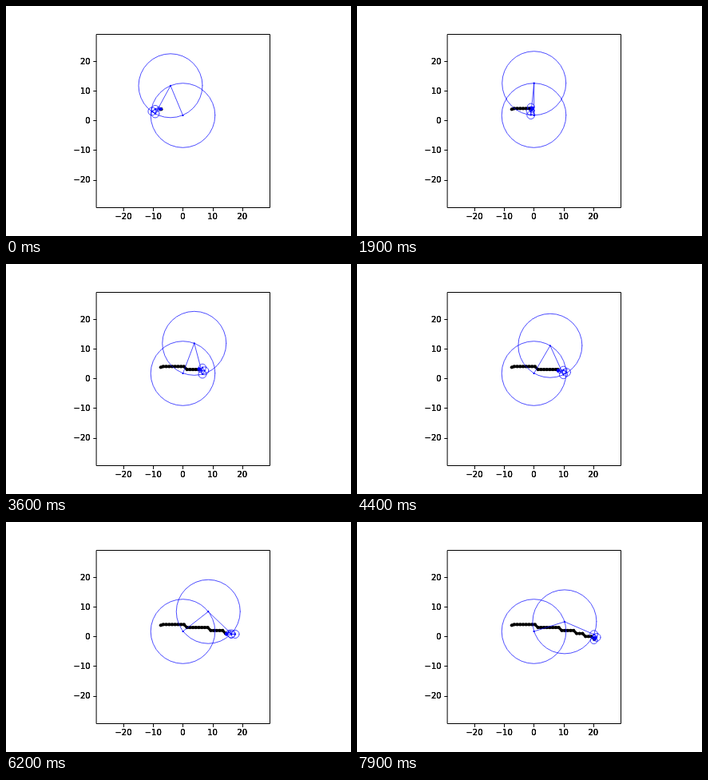
An HTML page with a canvas that plays this animation: 432x288 px, repeating every 8000 ms.

```html
<!DOCTYPE html>
<html>
<head>
<meta charset="utf-8">
<style>
html, body { margin: 0; width: 100%; height: 100%; overflow: hidden; background: #fff; }
canvas { display: block; }
</style>
</head>
<body>
<canvas id="stage" width="432" height="288"></canvas>
<script>
const ctx = document.getElementById('stage').getContext('2d');
const SCALE = 3.72, X0 = 221.4, Y0 = 143.28, RAD = Math.PI / 180;
const STEP = 100, FRAMES = 80, TURN = 1.204;
const BLUE = '#00f';
const px = x => X0 + x * SCALE;
const py = y => Y0 - y * SCALE;
const snap = v => Math.floor(v + 0.5) + 0.5;

// Epicycles: turns per cycle, radius in pixels, starting angle in degrees
const wheels = [
  [-1, 40.3, 112.6], [1, 40, -118.5],
  [-2, 5, 143], [2, 5, 37],
  [-3, 4.5, 0], [3, 2.6, 5]
];
for (let k = 4; k < 8; k++) wheels.push([-k, 5 / k, 150], [k, 4 / k, 20]);

// Traced outline: one unit right per step, one unit down at each drop
const drops = [8, 16, 21, 24, 27];
const START = 0.2;
function outline(k) {
  let y = 4 - 0.3 * Math.max(0, 1 - k);
  for (const d of drops) y -= Math.min(1, Math.max(0, k - d));
  return [px(k - 7.6), py(y)];
}

function line(points, width, color) {
  ctx.beginPath();
  points.forEach(p => ctx.lineTo(...p));
  ctx.lineWidth = width;
  ctx.strokeStyle = color;
  ctx.stroke();
}

function circle(x, y, r) {
  ctx.beginPath();
  ctx.arc(x, y, r, 0, 2 * Math.PI);
}

function dot([x, y], r, color) {
  circle(x, y, r);
  ctx.fillStyle = color;
  ctx.fill();
}

function label(text, x, y, align) {
  ctx.textAlign = align;
  for (let i = 0; i < 3; i++) ctx.fillText(text, x, y);
}

function axes() {
  ctx.lineWidth = 1;
  ctx.strokeStyle = ctx.fillStyle = '#000';
  ctx.strokeRect(113.5, 35.5, 217, 217);
  ctx.font = '10px "DejaVu Sans", sans-serif';
  for (let v = -20; v <= 20; v += 10) {
    const text = String(v).replace('-', '\u2212');
    const x = snap(px(v)), y = snap(py(v));
    line([[x, 253], [x, 256.5]], 1, '#000');
    line([[109.5, y], [113, y]], 1, '#000');
    label(text, px(v), 267, 'center');
    label(text, 105.7, py(v) + 3.8, 'right');
  }
}

function trail(k) {
  const points = [outline(START)];
  for (let i = 1; i < k; i++) points.push(outline(i));
  points.push(outline(k));
  ctx.lineJoin = ctx.lineCap = 'round';
  line(points, 3.2, '#000');
  points.forEach(p => dot(p, 2.1, '#000'));
}

function arms(n, pen) {
  const joints = [[X0 + 0.1, 137]];
  wheels.forEach(([freq, r, start], i) => {
    const a = (start + freq * TURN * n) * RAD;
    const [x, y] = joints[i];
    joints.push([x + r * Math.cos(a), y - r * Math.sin(a)]);
  });

  // Spread what is left over the smallest wheels so the last one meets the pen
  const first = 5, last = wheels.length;
  const [ex, ey] = joints[last];
  for (let i = first + 1; i <= last; i++) {
    const share = (i - first) / (last - first);
    joints[i][0] += (pen[0] - ex) * share;
    joints[i][1] += (pen[1] - ey) * share;
  }

  ctx.lineWidth = 0.7;
  ctx.strokeStyle = BLUE;
  wheels.forEach(([, r], i) => {
    circle(...joints[i], r);
    ctx.stroke();
  });
  line(joints, 0.7, BLUE);
  joints.forEach(p => dot(p, 1.1, BLUE));
}

function draw(now) {
  const n = Math.floor(now / STEP) % FRAMES;
  const k = (n + 1) / 2.86;
  ctx.fillStyle = '#fff';
  ctx.fillRect(0, 0, 432, 288);
  axes();
  trail(k);
  arms(n, outline(k));
  requestAnimationFrame(draw);
}

draw(0);
</script>
</body>
</html>
```
